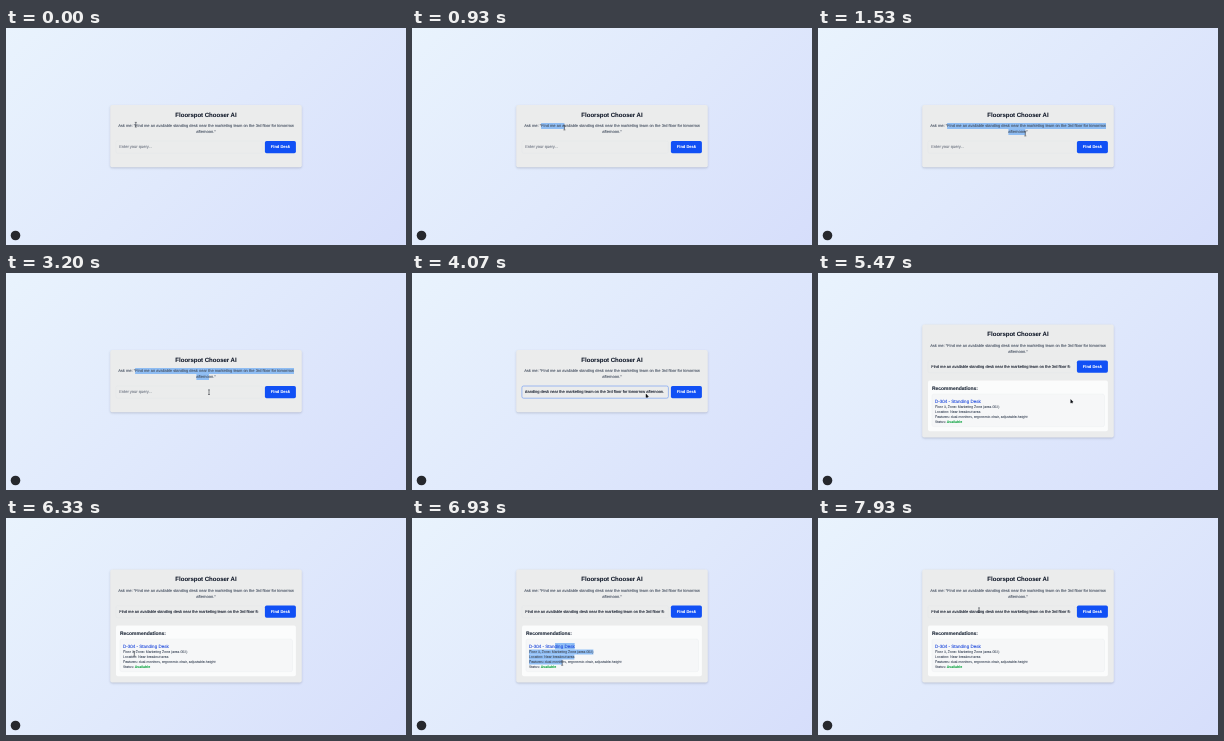
An HTML page with a canvas for the animation above (8 s loop, 400 px wide and 217 px high).

```html
<!DOCTYPE html>
<html lang="en">
<head>
<meta charset="utf-8">
<title>Desk finder</title>
<style>
  html, body { margin: 0; width: 100%; height: 100%; overflow: hidden; background: #e0e9fc; }
  canvas { display: block; width: 100vw; height: 100vh; }
</style>
</head>
<body>
<canvas id="stage"></canvas>
<script>
const W = 400, H = 217, LOOP = 8000;
const FONT = '"Liberation Sans", Arial, sans-serif';
const PROMPT = 'Find me an available standing desk near the marketing team on the 3rd floor for tomorrow';
const DETAILS = [
  'Floor 3, Zone: Marketing Zone (area-002)',
  'Location: Near breakout area',
  'Features: dual-monitors, ergonomic-chair, adjustable-height'
];
const INK = '#101828', BODY = '#4a5565', BLUE = '#1150f5';
const SELECTION = 'rgba(120, 178, 246, .8)';

// Moments of the interaction, in ms
const T = {
  drag: 800, focus: 3270, paste: 3530, press: 4270, search: 4530,
  result: 5230, dragResult: 6480, clear: 7070
};

// Places where the pointer rests
const SPOT = {
  quote: { x: 129.8, y: 96.7 },
  afternoon: { x: 207.3, y: 105.6 },
  input: { x: 203, y: 119.2 },
  button: { x: 264.5, y: 122.8 },
  desk: { x: 143, y: 128.5 },
  features: { x: 150.2, y: 145 },
  query: { x: 161, y: 92.2 }
};

// Each move goes to a spot; bow bends it sideways halfway
const MOVES = [
  { at: T.drag, until: 1530, to: SPOT.afternoon, bow: [30, 4] },
  { at: 1670, until: 2130, to: SPOT.afternoon, bow: [68, 12] },
  { at: 2970, until: 3190, to: SPOT.input },
  { at: 3900, until: 4240, to: SPOT.button },
  { at: 5400, until: T.dragResult, to: SPOT.desk, bow: [-50, 18] },
  { at: T.dragResult, until: 6930, to: SPOT.features },
  { at: 7130, until: 7930, to: SPOT.query, bow: [-33, 0] }
];

const canvas = document.getElementById('stage');
const ctx = canvas.getContext('2d');
const clamp = (v, lo, hi) => Math.min(hi, Math.max(lo, v));

function resize() {
  const dpr = window.devicePixelRatio || 1;
  canvas.width = Math.round(innerWidth * dpr);
  canvas.height = Math.round(innerHeight * dpr);
}
addEventListener('resize', resize);
resize();

function pointerAt(t) {
  let { x, y } = SPOT.quote;
  for (const { at, until, to, bow = [0, 0] } of MOVES) {
    const u = clamp((t - at) / (until - at), 0, 1);
    const ease = u * u * (3 - 2 * u), bend = Math.sin(Math.PI * u);
    x += (to.x - x) * ease + bow[0] * bend;
    y += (to.y - y) * ease + bow[1] * bend;
  }
  return { x, y };
}

function setFont(size, weight = 400) {
  ctx.font = `${weight} ${size}px ${FONT}`;
  ctx.textRendering = 'geometricPrecision';
}

function widthOf(str, size) {
  setFont(size);
  return ctx.measureText(str).width;
}

// Draws text by its vertical middle; the hairline keeps small type solid
function text(str, x, y, size, color, weight = 400, align = 'left') {
  setFont(size, weight);
  ctx.textAlign = align;
  ctx.fillStyle = ctx.strokeStyle = color;
  ctx.lineWidth = 0.08;
  ctx.fillText(str, x, y + size * 0.35);
  ctx.strokeText(str, x, y + size * 0.35);
  return ctx.measureText(str).width;
}

function box(x, y, w, h, r, fill, stroke, line = 0.3) {
  ctx.beginPath();
  ctx.roundRect(x, y, w, h, r);
  if (fill) { ctx.fillStyle = fill; ctx.fill(); }
  if (stroke) { ctx.strokeStyle = stroke; ctx.lineWidth = line; ctx.stroke(); }
}

// Marks a line of text up to the given end, never past its own end
function highlight(from, lineEnd, to, y, h) {
  ctx.fillStyle = SELECTION;
  ctx.fillRect(from, y - h / 2, clamp(to, from, lineEnd) - from, h);
}

function background() {
  const g = ctx.createLinearGradient(45.75, -45.75, 354.25, 262.75);
  g.addColorStop(0, '#e9f3fd');
  g.addColorStop(0.5, '#e0e9fc');
  g.addColorStop(1, '#d6defb');
  ctx.fillStyle = g;
  ctx.fillRect(0, 0, W, H);
}

function card(y, h) {
  const scale = canvas.width / W;
  ctx.save();
  ctx.shadowColor = 'rgba(40, 50, 80, .22)';
  ctx.shadowBlur = 2.2 * scale;
  ctx.shadowOffsetY = scale;
  box(104.2, y, 191.6, h, 2, '#ebecec');
  ctx.restore();
}

function intro(t, y, pointer) {
  const first = y + 21, second = y + 27;
  text('Floorspot Chooser AI', 200, y + 9.7, 6.03, INK, 700, 'center');
  if (t >= T.drag && t < T.focus) {
    const wrapped = pointer.y > first + 3;
    highlight(129.1, 288, wrapped ? W : pointer.x, first, 6);
    if (wrapped) highlight(190.4, 208.3, pointer.x, second, 6);
  }
  text(`Ask me: "${PROMPT}`, 200, first, 4, BODY, 400, 'center');
  text('afternoon."', 200, second, 4, BODY, 400, 'center');
}

function form(t, y) {
  const searching = t >= T.search && t < T.result;
  const focused = t >= T.focus && t < T.press;
  const hover = t > 4200 && t < T.search;
  const right = 289.9, left = searching ? 255.3 : 258.9;
  const top = y + 36, mid = y + 42;

  box(109.9, top, left - 112.4, 12.2, 1.7, null,
    focused ? '#5b8df5' : 'rgba(200, 205, 215, .35)', focused ? 0.55 : 0.25);

  ctx.save();
  ctx.beginPath();
  ctx.rect(113, top, left - 119.7, 12);
  ctx.clip();
  if (t < T.paste) text('Enter your query...', 113.2, mid, 4, '#737a87');
  else if (focused) text(`${PROMPT} afternoon.`, left - 6.7, mid, 4, INK, 400, 'right');
  else text(`${PROMPT} afternoon.`, 113.2, mid, 4, INK);
  ctx.restore();

  const fill = searching ? '#7391ec' : hover ? '#1244dc' : BLUE;
  box(left, top, right - left, 12.2, 1.7, fill);
  text(searching ? 'Searching...' : 'Find Desk', (left + right) / 2, mid, 4,
    searching ? '#e6ebfb' : '#fff', 700, 'center');
}

function results(t, pointer) {
  const x = 117, name = 'D-304 - Standing Desk';
  const nameY = 128.2, rowY = i => 134 + 5 * i;

  box(110, 107.6, 179.9, 50.6, 2, '#fbfcfc');
  text('Recommendations:', 114, 115, 4.97, '#1e2939', 700);
  box(114, 121.2, 172.5, 32.4, 1.7, '#f6f7f8', '#e3e6ea');

  if (t >= T.dragResult && t < T.clear) {
    const row = Math.floor((pointer.y - 131.5) / 5);
    highlight(SPOT.desk.x, x + widthOf(name, 4.52), row < 0 ? pointer.x : W, nameY, 6.4);
    DETAILS.slice(0, row + 1).forEach((line, i) =>
      highlight(x, x + widthOf(line, 3.5), i < row ? W : pointer.x, rowY(i), 5));
  }

  text(name, x, nameY, 4.52, '#1d49dc');
  DETAILS.forEach((line, i) => text(line, x, rowY(i), 3.5, BODY));
  const w = text('Status: ', x, rowY(3), 3.5, BODY);
  text('Available', x + w, rowY(3), 3.5, '#12a544', 700);
}

function iBeam({ x, y }) {
  ctx.beginPath();
  ctx.moveTo(x, y - 2);
  ctx.lineTo(x, y + 2);
  for (const end of [-2.3, 2.3]) {
    ctx.moveTo(x - 1, y + end);
    ctx.lineTo(x + 1, y + end);
  }
  ctx.strokeStyle = '#22262e';
  ctx.lineWidth = 0.55;
  ctx.stroke();
}

function arrow({ x, y }) {
  ctx.beginPath();
  ctx.moveTo(x, y);
  ctx.lineTo(x, y + 3.5);
  ctx.lineTo(x + 2.4, y + 2.5);
  ctx.closePath();
  ctx.moveTo(x + 0.9, y + 2);
  ctx.lineTo(x + 1.7, y + 3.9);
  ctx.strokeStyle = ctx.fillStyle = '#0b0d12';
  ctx.lineWidth = 0.4;
  ctx.fill();
  ctx.stroke();
}

function badge() {
  ctx.beginPath();
  ctx.arc(9.5, 207.5, 4.8, 0, Math.PI * 2);
  ctx.fillStyle = '#26282d';
  ctx.fill();
}

function draw(t) {
  const pointer = pointerAt(t);
  const open = t >= T.result;
  const y = open ? 51.6 : 77;

  ctx.setTransform(canvas.width / W, 0, 0, canvas.height / H, 0, 0);
  background();
  card(y, open ? 113 : 62.2);
  intro(t, y, pointer);
  form(t, y);
  if (open) results(t, pointer);
  badge();

  const typing = t >= T.paste && t < 3900;
  const offText = t > 3900 && pointer.x > 220;
  if (!typing) (offText ? arrow : iBeam)(pointer);
}

const start = performance.now();
function tick() {
  draw((performance.now() - start) % LOOP);
  requestAnimationFrame(tick);
}
tick();
</script>
</body>
</html>
```
